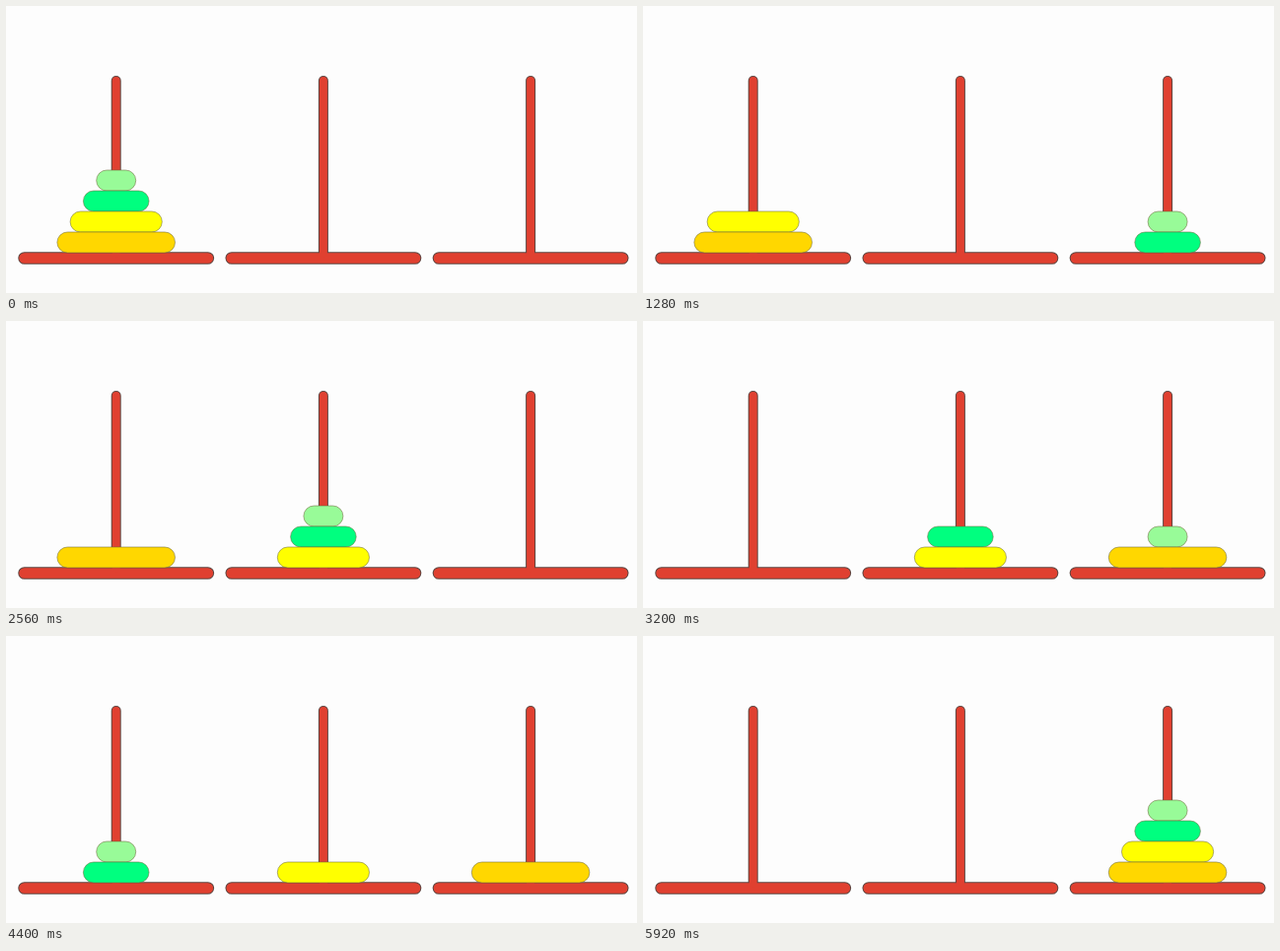
An HTML page for the animation above (6000 ms loop, 640 px wide and 292 px high).

```html
<!DOCTYPE html>
<html lang="en">
<head>
<meta charset="utf-8">
<title>Tower of Hanoi</title>
<style>
  html, body { margin: 0; width: 100%; height: 100%; overflow: hidden; background: #fdfdfd; }
  svg { display: block; width: 640px; height: 292px; }
  .edge { fill: #5c4540; }
  .wood { fill: #e04030; }
  .disk { stroke: #6e6a3c; stroke-opacity: .7; stroke-width: .8; }
</style>
</head>
<body>
<svg id="stage" viewBox="0 0 640 292"></svg>
<script>
const LOOP = 6000;
const PEG_X = [111.7, 321.9, 532.1];
const FLOOR = 251;
const DISK_H = 21;
const DISKS = [
  { width: 40, color: '#98fb98' },
  { width: 66.6, color: '#00ff7f' },
  { width: 93.2, color: '#ffff00' },
  { width: 119.6, color: '#ffd700' }
];
// Start of each move in ms
const TIMES = [80, 400, 1120, 1440, 1760, 2080, 2480, 2800, 3120, 3440, 4240, 4560, 4880, 5200, 5520];

const stage = document.getElementById('stage');

function addRect(cls, x, y, width, height, radius) {
  const el = document.createElementNS('http://www.w3.org/2000/svg', 'rect');
  const attrs = { class: cls, x, y, width, height, rx: radius };
  for (const key in attrs) el.setAttribute(key, attrs[key]);
  stage.append(el);
  return el;
}

// The edge layer lies under the wood, so post and base share one outline
function drawStand(x) {
  for (const [cls, inset] of [['edge', 0], ['wood', 1]]) {
    const size = 2 * inset;
    addRect(cls, x - 99.4 + inset, 250.2 + inset, 198.8 - size, 12.6 - size, 6.3 - inset);
    addRect(cls, x - 5 + inset, 71 + inset, 10 - size, 186 - size, 5 - inset);
  }
}

function solve(n, from, to, via) {
  if (n < 0) return [];
  return [...solve(n - 1, from, via, to), { disk: n, to }, ...solve(n - 1, via, to, from)];
}

PEG_X.forEach(drawStand);
const disks = DISKS.map(({ width, color }) => {
  const el = addRect('disk', -width / 2, -DISK_H, width, DISK_H, DISK_H / 2);
  el.setAttribute('fill', color);
  return el;
});
const moves = solve(DISKS.length - 1, 0, 2, 1);

function render(time) {
  const peg = DISKS.map(() => 0);
  TIMES.forEach((start, i) => {
    if (time >= start) peg[moves[i].disk] = moves[i].to;
  });
  const stack = [0, 0, 0];
  for (let i = disks.length - 1; i >= 0; i--) {
    const y = FLOOR - DISK_H * stack[peg[i]]++;
    disks[i].setAttribute('transform', `translate(${PEG_X[peg[i]]} ${y})`);
  }
}

const begin = performance.now();
function tick() {
  render((performance.now() - begin) % LOOP);
  requestAnimationFrame(tick);
}
render(0);
requestAnimationFrame(tick);
</script>
</body>
</html>
```
